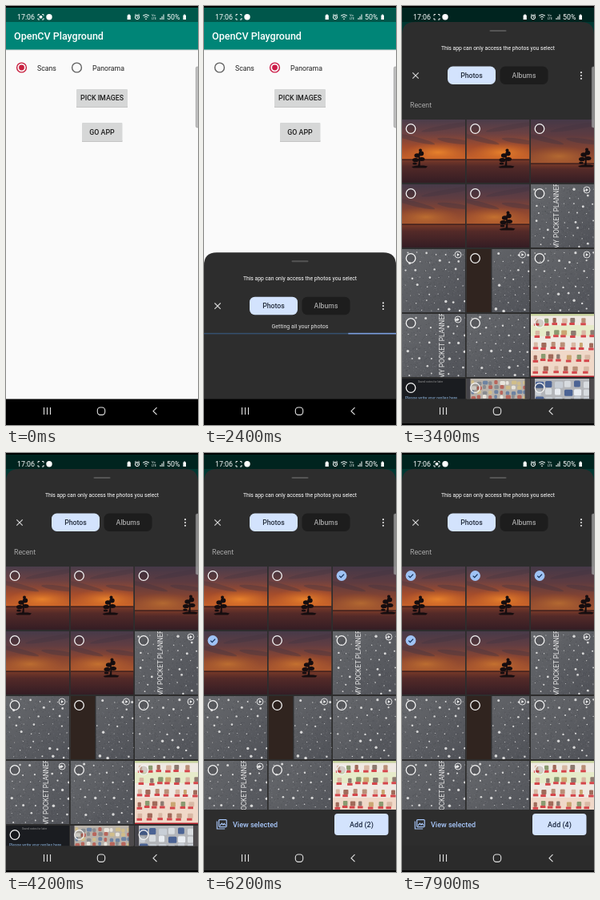
Write an HTML page that moves like this. It is 240 px wide and 524 px high and loops after 8000 ms.

```html
<!DOCTYPE html>
<html lang="en">
<head>
<meta charset="utf-8">
<title>Picking images</title>
<style>
  html, body { margin: 0; width: 100%; height: 100%; overflow: hidden; background: #000; }
  body > svg { display: block; width: 100vw; height: 100vh; }
  text { font-family: Roboto, sans-serif; }
  .m { font-weight: 500; }
  .mid { text-anchor: middle; }
</style>
</head>
<body>
<svg id="stage" viewBox="0 0 240 524">
  <defs>
    <linearGradient id="sky" x2="0" y2="1">
      <stop offset="0" stop-color="#4b3d4b"/>
      <stop offset=".35" stop-color="#6c4142"/>
      <stop offset=".68" stop-color="#a34c2c"/>
      <stop offset="1" stop-color="#c9632a"/>
    </linearGradient>
    <linearGradient id="sea" x2="0" y2="1">
      <stop offset="0" stop-color="#7a3a28"/>
      <stop offset=".3" stop-color="#542a28"/>
      <stop offset="1" stop-color="#341d24"/>
    </linearGradient>
    <radialGradient id="glow">
      <stop offset="0" stop-color="#f8902c" stop-opacity=".75"/>
      <stop offset="1" stop-color="#e07020" stop-opacity="0"/>
    </radialGradient>
    <linearGradient id="paper" x2="1" y2="1">
      <stop offset="0" stop-color="#66686c"/>
      <stop offset="1" stop-color="#505258"/>
    </linearGradient>
    <g id="tree" fill="#150d0f">
      <path d="M-9 0Q0-3 11-.5L9 1.5H-7ZM-1.3 0Q1-8-1-14L1-15Q2-8 1.8 0Z"/>
      <ellipse cx="-4" cy="-8.5" rx="4" ry="2.6"/>
      <ellipse cx="3.5" cy="-9.5" rx="4" ry="2.5"/>
      <ellipse cx="-2" cy="-14" rx="3.6" ry="2.8"/>
      <ellipse cx="3" cy="-16.5" rx="3.2" ry="3"/>
      <ellipse cx="2" cy="-20.5" rx="2" ry="2"/>
      <ellipse cx="-5" cy="-4" rx="2.8" ry="1.6"/>
    </g>
    <g id="play" fill="none" stroke="#eee" stroke-width=".9">
      <circle r="4"/><path d="M-1.2-2L2 0L-1.2 2Z" fill="#eee" stroke="none"/>
    </g>
  </defs>

  <!-- App screen -->
  <rect width="240" height="492" fill="#fafafa"/>
  <rect y="54" width="240" height="1.5" fill="#d5d8d8"/>
  <rect width="240" height="54.5" fill="#008577"/>
  <rect width="240" height="20" fill="#00574b"/>
  <text class="m" x="10" y="42" font-size="12.5" fill="#fff">OpenCV Playground</text>
  <g id="scans" transform="translate(19.5 77)"></g>
  <g id="panorama" transform="translate(88.5 77)"></g>
  <g font-size="8.75" fill="#222">
    <text x="39" y="80.5">Scans</text>
    <text x="108" y="80.5">Panorama</text>
  </g>
  <g class="m mid" font-size="8.8" fill="#1d1d1d">
    <rect x="88" y="125" width="64" height="2" fill="#c4c4c4"/>
    <rect id="pick" x="88" y="104" width="64" height="22" rx="1"/>
    <text x="120" y="118.3">PICK IMAGES</text>
    <rect x="95" y="168" width="50.5" height="2" fill="#c4c4c4"/>
    <rect x="95" y="146" width="50.5" height="23" rx="1" fill="#d6d7d7"/>
    <text x="120" y="161">GO APP</text>
  </g>
  <rect id="scrim" width="240" height="492"/>

  <!-- Photo picker -->
  <g id="sheet">
    <path d="M0 524V36Q0 20 16 20H224Q240 20 240 36V524Z" fill="#2d2d2d"/>
    <rect x="109.5" y="30" width="21" height="2" rx="1" fill="#555"/>
    <text class="mid" x="120" y="54.7" font-size="6.8" fill="#fff">This app can only access the photos you select</text>
    <path d="M13.3 83.3l7.4 7.4m0-7.4l-7.4 7.4" stroke="#d4d4d4" stroke-width="1.2"/>
    <rect x="57" y="75.5" width="60" height="22.5" rx="6.5" fill="#d3e3fd"/>
    <rect x="122.5" y="75.5" width="60" height="22.5" rx="6.5" fill="#1d1d1d"/>
    <g class="m mid" font-size="8.7">
      <text x="87" y="90" fill="#222b3a">Photos</text>
      <text x="152.5" y="90" fill="#a5a5a5">Albums</text>
    </g>
    <path d="M224 83.2v.01M224 87v.01M224 90.8v.01" stroke="#ddd" stroke-width="2.2" stroke-linecap="round"/>
    <g id="loading">
      <text class="mid" x="120" y="114.6" font-size="7.1" fill="#e4e4e4">Getting all your photos</text>
      <rect y="120.7" width="240" height="1.5" fill="#35506f"/>
      <rect id="progress" y="120.7" width="60" height="1.5" fill="#7d9fe0"/>
    </g>
    <g id="grid">
      <text x="10" y="126.5" font-size="8.8" fill="#a8a8a8">Recent</text>
      <g id="cells"></g>
      <g id="marks"></g>
    </g>
    <g id="bar">
      <rect y="446" width="240" height="46" fill="#2d2d2d"/>
      <g fill="none" stroke="#a8c7fa" stroke-width="1.2">
        <rect x="18.6" y="458.6" width="9.6" height="9" rx="1"/>
        <path d="M16.3 460.5v9.5h9.8M20 466l2.3-2.8 1.6 1.8 1.4-1.5 2 2.5"/>
      </g>
      <text class="m" x="36" y="467.5" font-size="9" fill="#a8c7fa">View selected</text>
      <rect x="163" y="451" width="67.5" height="27" rx="4" fill="#d3e3fd"/>
      <text id="add" class="m mid" x="197" y="467.7" font-size="9" fill="#1c2a41"></text>
    </g>
  </g>

  <!-- System bars -->
  <rect x="237.3" y="76" width="4" height="76" rx="1.8" fill="#aaa" fill-opacity=".75" stroke="#888" stroke-width=".5"/>
  <rect id="nav" y="491.5" width="240" height="32.5"/>
  <rect width="240" height="2"/>
  <rect y="522" width="240" height="2"/>
  <g fill="none" stroke="#e2e2e2" stroke-width="1.1">
    <path d="M47.5 502v9M51.5 502v9M55.5 502v9M188.5 502.2l-4.5 4.5 4.5 4.5"/>
    <rect x="114.3" y="502" width="9.4" height="9.4" rx="3.6"/>
  </g>
  <g fill="#fff">
    <text x="14" y="16.7" font-size="8.8">17:06</text>
    <path d="M42 10.5h-2v2M45 10.5h2v2M42 17h-2v-2M45 17h2v-2" fill="none" stroke="#fff" stroke-width=".9"/>
    <rect id="blink" x="41.7" y="12" width="3.6" height="3.6" rx="1"/>
    <circle cx="54" cy="13.8" r="3.7"/>
    <path d="M151.6 11.5h1v-1h2.2v1h1v5.5h-4.2Z"/>
    <g fill="none" stroke="#fff" stroke-width="1">
      <circle cx="164" cy="14" r="2.6"/>
      <path d="M161 11.5l1.4-1.2M167 11.5l-1.4-1.2M164 12.5v1.7h1.2"/>
      <path d="M171 12.2q4-3 8 0M172.6 14.2q2.4-2 4.8 0M174 16.2h2"/>
      <path d="M193 17v-2M195 17v-4M197 17v-6.5"/>
    </g>
    <text x="182" y="13.4" font-size="4">Vo</text>
    <text x="182" y="17" font-size="3.8">LTE</text>
    <text x="201" y="16.7" font-size="8.8">50%</text>
    <path d="M221.4 11.4h1v-1h1.6v1h1V17h-3.6Z"/>
  </g>
</svg>
<script>
const LOOP = 8000, PITCH = 81, TOP = 142;
const $ = id => document.getElementById(id);
const clamp = v => Math.max(0, Math.min(1, v));
const ramp = (t, from, to) => clamp((t - from) / (to - from));
const easeOut = v => 1 - (1 - v) ** 3;
const random = seed => () => (seed = seed * 16807 % 2147483647) / 2147483647;
const rect = (x, y, w, h, fill, extra = '') =>
  `<rect x="${x}" y="${y}" width="${w}" height="${h}" fill="${fill}" ${extra}/>`;

function sunset({ tree, horizon = 50, base = horizon + 9, dim = 0, glow = 45 }) {
  const cloud = (x, y, rx, turn) => `<ellipse cx="${x}" cy="${y}" rx="${rx}" ry="3"
    fill="#463540" opacity=".4" transform="rotate(${turn} ${x} ${y})"/>`;
  return rect(0, 0, 79, horizon, 'url(#sky)') +
    `<ellipse cx="${glow}" cy="${horizon - 9}" rx="42" ry="13" fill="url(#glow)"/>` +
    cloud(58, 9, 34, -10) + cloud(14, 24, 28, 14) + cloud(66, 27, 22, 8) +
    rect(0, 0, 79, horizon, '#3a3040', `opacity="${dim}"`) +
    rect(0, horizon, 79, 79 - horizon, 'url(#sea)') +
    rect(0, horizon - .6, 79, 1.4, '#3a1d1c') +
    (tree ? `<use href="#tree" x="${tree}" y="${base}"/>` : '');
}

function notebook(seed, { title, dark = 0, video = true } = {}) {
  const next = random(seed * 7919);
  let out = rect(0, 0, 79, 79, 'url(#paper)');
  for (let i = 0; i < 500; i++)
    out += rect((next() * 79).toFixed(1), (next() * 79).toFixed(1), .8, .8, next() < .5 ? '#808388' : '#424449', 'opacity=".6"');
  for (let row = 0; row < 8; row++)
    for (let col = 0; col < 7; col++) {
      const x = 4 + col * 12 + (row % 2) * 5 + next() * 4, y = 4 + row * 10 + next() * 4;
      const r = .5 + next() ** 2 * 1.3;
      if (x > dark && !(Math.abs(x - title) < 7))
        out += `<circle cx="${x.toFixed(1)}" cy="${y.toFixed(1)}" r="${r.toFixed(1)}" fill="#d8d8d8"/>`;
    }
  if (dark) out += rect(0, 0, dark, 79, '#30241f') + rect(dark, 0, .8, 79, '#17181a');
  if (title) out += `<text transform="translate(${title + 3} 81) rotate(-90)"
    font-size="8.2" fill="#e8e8e8">MY POCKET PLANNER</text>`;
  return out + (video ? '<use href="#play" x="70" y="7"/>' : '');
}

// Rows of small goods with red price tags
function leaflet(seed) {
  const next = random(seed * 104729);
  const goods = ['#b98f78', '#c9a672', '#8a9a70', '#a06a5a', '#d8b8a4', '#8c7a70'];
  let out = rect(0, 0, 79, 79, '#efe9e2') + rect(0, 14, 79, 14, '#e6ebc9') +
    rect(0, 46, 79, 32, '#f0d8c8') + rect(0, 0, 79, 2.5, '#c3cf9a');
  for (let row = 0; row < 5; row++)
    for (let x = 3 + next() * 5; x < 75; x += 9 + next() * 5) {
      const y = 5 + row * 15 + next() * 2;
      out += rect(x.toFixed(1), y.toFixed(1), 4 + next() * 3, 6, goods[Math.floor(next() * 6)], 'rx="1"') +
        rect((x - 1).toFixed(1), (y + 6).toFixed(1), 6.5, 3, '#d4454a');
    }
  return out + rect(0, 77.5, 79, 1.5, '#b3202c');
}

function shelf(seed, paper, goods, size) {
  const next = random(seed * 104729);
  let out = rect(0, 0, 79, 26, paper);
  for (let x = 6; x < 72; x += size * 1.2)
    for (let y = 2; y < 26; y += size)
      out += rect(x, (y + next() * 2).toFixed(1), size * (.6 + next() * .5), size * .8, goods[Math.floor(next() * goods.length)], 'rx="1.5"');
  return out + rect(0, 0, 5, 26, '#45444a') + rect(73, 0, 6, 26, '#4d4a4c');
}

const screenshot = rect(0, 0, 79, 79, '#1a1c20') +
  '<text x="20" y="5" font-size="3.4" fill="#999">Saved notes for later</text>' +
  '<text x="4" y="25.5" font-size="5" fill="#8fb6de">Please write your replies here</text>';

const photos = [
  sunset({ tree: 21 }),
  sunset({ tree: 49 }),
  sunset({ tree: 68, horizon: 55, base: 58, dim: .3, glow: 35 }),
  sunset({ dim: .25, glow: 30 }),
  sunset({ tree: 50, base: 56, dim: .2, glow: 35 }),
  notebook(3, { title: 32 }),
  notebook(4), notebook(5, { dark: 31 }), notebook(6),
  notebook(7, { title: 50 }), notebook(8, { video: false }),
  leaflet(9),
  screenshot,
  shelf(11, '#b8b2aa', ['#e8e4dc', '#6d83a2', '#b8665c', '#d0bd8a', '#8a8d90'], 6),
  shelf(12, '#b4b6ba', ['#e9edf2', '#4b6394', '#c8ced6', '#d8dce0'], 10)
];
const place = i => [i % 3 * 80.5, TOP + Math.floor(i / 3) * PITCH];

$('cells').innerHTML = photos.map((art, i) => {
  const [x, y] = place(i);
  return `<svg x="${x}" y="${y}" width="79" height="${Math.min(79, 491.5 - y)}">${art}</svg>`;
}).join('');
$('marks').innerHTML = photos.map((_, i) => {
  const [x, y] = place(i);
  return `<g transform="translate(${x + 11} ${y + 11.5})"><g></g></g>`;
}).join('');
const marks = [...$('marks').children].map(g => g.firstChild);
const EMPTY = '<circle r="5.8" fill="#000" fill-opacity=".12" stroke="#f4f4f4" stroke-width="1.3"/>';
const TICKED = '<circle r="6.4" fill="#9fc3f5"/><path d="M-2.8.1l2 2 3.8-4" fill="none" stroke="#14315c" stroke-width="1.3"/>';

// Tap time and photo index
const taps = [[5450, 3], [6000, 2], [6700, 1], [7300, 0]];

function setHtml(node, html) {
  if (node.shown !== html) node.innerHTML = node.shown = html;
}

function radio(color, dot, halo = 0) {
  return `<circle r="12.5" fill="#bbb" opacity="${halo * .6}"/>
    <circle r="5.9" fill="none" stroke="${color}" stroke-width="1.4"/>
    <circle r="${dot}" fill="${color}"/>`;
}

function draw(t) {
  const chosen = t >= 1150, settle = ramp(t, 1200, 1350);
  const halo = ramp(t, 1050, 1150) * (1 - ramp(t, 1300, 1600));
  setHtml($('scans'), chosen ? radio('#626262', 5.8 * (1 - settle)) : radio('#c8203f', 3.4));
  setHtml($('panorama'), chosen ? radio('#cc1c48', 5.8 - 2.4 * settle, halo) : radio('#626262', 0, halo));
  $('pick').setAttribute('fill', t > 2050 && t < 2400 ? '#bfc0c0' : '#d6d7d7');

  // The sheet arrives before the dimming behind it is complete
  const rise = easeOut(ramp(t, 2350, 2650));
  $('scrim').setAttribute('opacity', .58 * ramp(t, 2400, 2900));
  $('sheet').setAttribute('transform', `translate(0 ${(1 - rise) * 504})`);
  $('nav').setAttribute('fill', rise > .9 ? '#2b2b2b' : '#000');

  const loaded = t >= 3100;
  $('loading').setAttribute('visibility', loaded ? 'hidden' : 'visible');
  $('progress').setAttribute('x', (t + 400) % 1000 / 1000 * 300 - 60);
  $('grid').setAttribute('opacity', ramp(t, 3100, 3200));

  marks.forEach((mark, i) => {
    const tap = taps.find(([at, index]) => index === i && t >= at);
    setHtml(mark, tap ? TICKED : EMPTY);
    mark.setAttribute('transform', `scale(${tap ? .8 + .2 * ramp(t, tap[0], tap[0] + 150) : 1})`);
  });
  const count = taps.filter(([at]) => t >= at).length;
  $('add').textContent = `Add (${count})`;
  const show = easeOut(ramp(t, taps[0][0], taps[0][0] + 250));
  $('bar').setAttribute('transform', `translate(0 ${(1 - show) * 46})`);
  $('bar').setAttribute('visibility', count ? 'visible' : 'hidden');

  const phase = t % 1000;
  $('blink').setAttribute('opacity', phase < 150 || phase >= 650 ? 1 : 0);
}

const start = performance.now();
function tick() {
  draw((performance.now() - start) % LOOP);
  requestAnimationFrame(tick);
}
tick();
</script>
</body>
</html>
```
